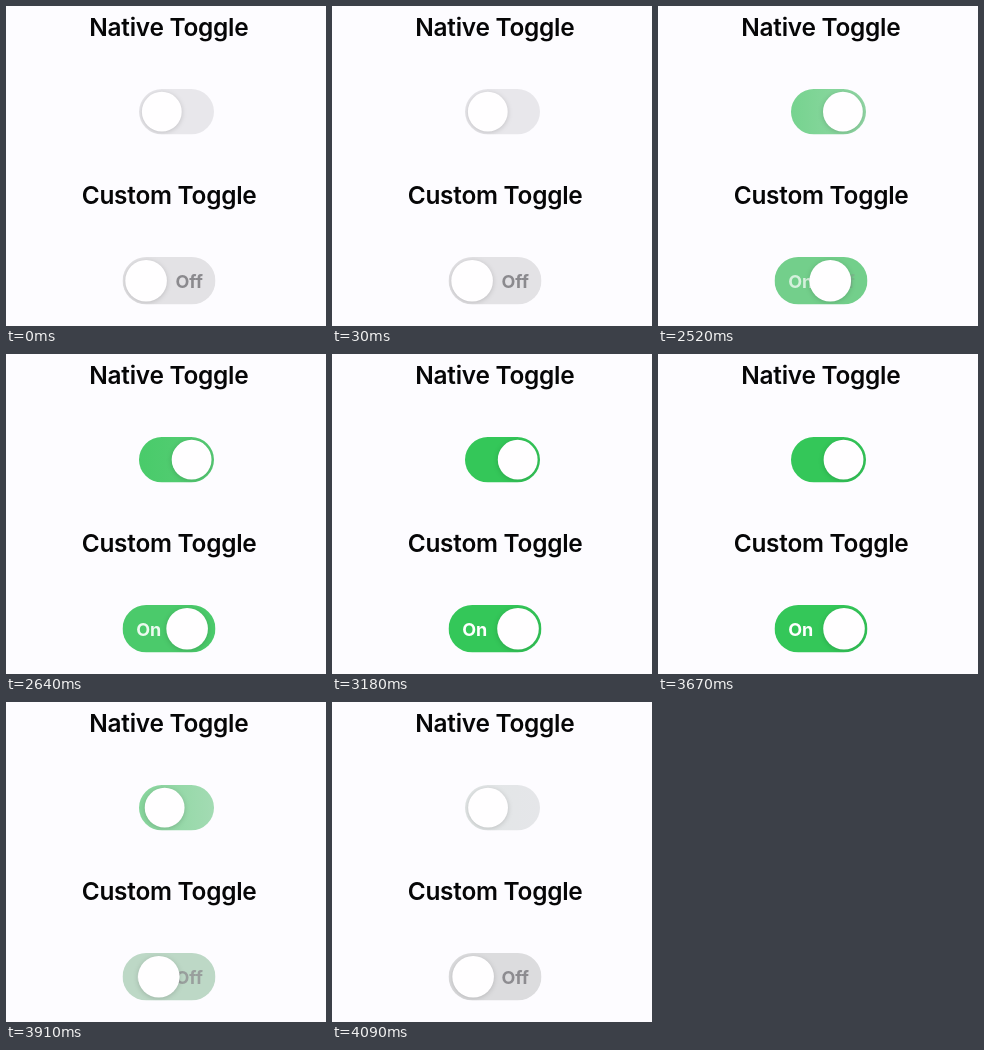
Animation of 320 by 320 pixels, one loop 4240 ms. Source, as an HTML page:

```html
<!DOCTYPE html>
<html lang="en">
<head>
<meta charset="utf-8">
<title>Toggles</title>
<style>
  html, body { margin: 0; width: 100%; height: 100%; overflow: hidden; background: #fdfcff; }
  svg { display: block; width: 100vw; height: 100vh; }
  text { font-family: Inter, "Open Sans", sans-serif; text-anchor: middle; }
  .title { font-size: 24.4px; font-weight: 600; letter-spacing: -0.25px; fill: #060607; }
  .label { font-size: 18px; font-weight: 700; }
  .knob { fill: #fffeff; filter: drop-shadow(.7px 1.6px 2.8px rgba(0, 0, 0, .17)); }
</style>
</head>
<body>
<svg viewBox="0 0 320 320">
  <defs>
    <linearGradient id="fill">
      <stop id="left" offset="0"/>
      <stop id="right" offset="1"/>
    </linearGradient>
    <clipPath id="nativeClip"><rect x="133" y="83" width="75" height="45.5" rx="22.75"/></clipPath>
    <clipPath id="customClip"><rect x="116.5" y="251" width="93" height="47.5" rx="23.75"/></clipPath>
  </defs>

  <text class="title" x="162.8" y="30.2">Native Toggle</text>
  <g clip-path="url(#nativeClip)">
    <rect x="133" y="83" width="75" height="45.5" fill="url(#fill)"/>
    <circle id="nativeKnob" class="knob" cy="105.7" r="19.9"/>
  </g>

  <text class="title" x="163.1" y="198.4">Custom Toggle</text>
  <g clip-path="url(#customClip)">
    <rect id="customTrack" x="116.5" y="251" width="93" height="47.5"/>
    <text id="off" class="label" x="183.2" y="281.6" fill="#8b8a8e">Off</text>
    <text id="on" class="label" x="142.8" y="281.6" fill="#fff">On</text>
    <circle id="customKnob" class="knob" cy="274.8" r="20.8"/>
  </g>
</svg>
<script>
  const LOOP = 4240;
  const ON = [2330, 2850], OFF = [3670, 4090];
  const PALE = [232, 231, 235], GREY = [227, 226, 229], DIM = [221, 220, 223];
  const GREEN = [52, 199, 89];
  const $ = id => document.getElementById(id);
  const clamp = v => Math.min(1, Math.max(0, v));
  const mix = (a, b, p) => a.map((v, i) => v + (b[i] - v) * p);
  const rgb = c => `rgb(${c.map(Math.round)})`;

  // Critically damped spring from 0 to 1; rate is per second.
  function spring(ms, rate) {
    const x = Math.max(0, ms) / 1000 * rate;
    return 1 - (1 + x) * Math.exp(-x);
  }

  function pose(t) {
    if (t < ON[0]) return { native: 0, custom: 0, tint: 0, dim: 0 };
    if (t < ON[1]) return {
      native: spring(t - 2246, 20),
      custom: spring(t - 2307, 11.42),
      tint: clamp((t - 2293) / 413),
      dim: 1
    };
    if (t < OFF[0]) return { native: 1, custom: 1, tint: 1, dim: 0 };
    const s = Math.min(t, OFF[1]);
    return {
      native: 1 - spring(s - 3664, 16),
      custom: 1 - spring(s - 3766, 17.6),
      tint: 1 - clamp((s - 3690) / 410),
      dim: 1
    };
  }

  function draw(t) {
    const p = pose(t);
    const skew = 0.32 * p.tint * (1 - p.tint);
    const green = p.custom ** 1.3;
    $("left").setAttribute("stop-color", rgb(mix(PALE, GREEN, p.tint + skew)));
    $("right").setAttribute("stop-color", rgb(mix(PALE, GREEN, p.tint - skew)));
    $("nativeKnob").setAttribute("cx", 155.8 + 29.9 * p.native);
    $("customKnob").setAttribute("cx", 140.1 + 45.9 * p.custom);
    $("customTrack").setAttribute("fill", rgb(mix(mix(GREY, DIM, p.dim), GREEN, green)));
    $("off").setAttribute("opacity", 1 - p.custom);
    $("on").setAttribute("opacity", p.custom);
  }

  const start = performance.now();
  function tick() {
    draw((performance.now() - start) % LOOP);
    requestAnimationFrame(tick);
  }
  tick();
</script>
</body>
</html>
```
